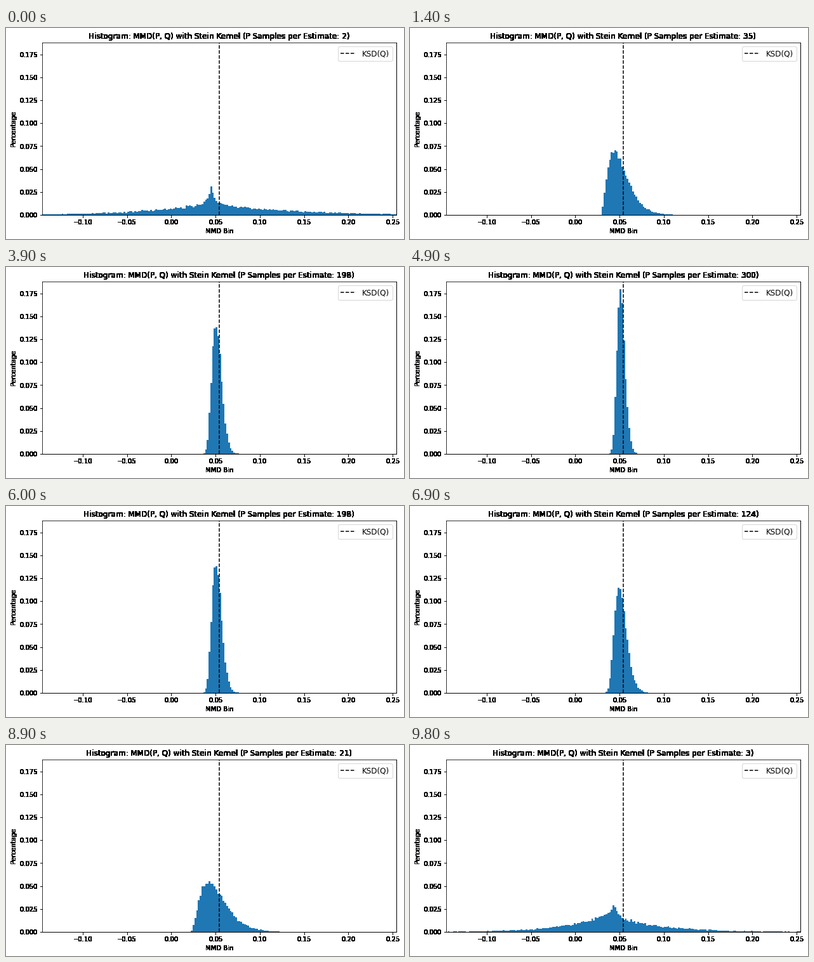
A matplotlib script for the animation above (9900 ms loop, 627 by 333 pixels).

```python
import math

import numpy as np
import matplotlib.pyplot as plt
from matplotlib.animation import FuncAnimation

W, H, DPI = 627, 333, 72
KSD = 0.0541
BIN = 0.002
STEPS = 50
DRAWS = 20000

edges = KSD + BIN * np.arange(-100, 101)
centres = (edges[:-1] + edges[1:]) / 2


def cusp(n):
    """Heavy-tailed peak seen with very few samples."""
    d = centres - 0.045
    tails = np.where(d < 0, 0.007 * n * np.exp(-np.abs(d) * n / 0.14),
                     0.0145 * np.exp(-np.abs(d) * n / 0.165))
    h = tails + 0.08 / n**2 * np.exp(-np.abs(d) / 0.004)
    return h / h.sum()


def hump(n):
    """Shifted gamma density that narrows and loses its skew as n grows."""
    k = max(3, 0.081 * n)
    sd = 0.0795 / math.sqrt(n)
    scale = sd / math.sqrt(k)
    t = np.maximum((centres - (KSD - 0.0021)) / scale + k, 0)
    return BIN / scale * t ** (k - 1) * np.exp(-t) / math.gamma(k)


def heights(n):
    w = np.clip((21 - n) / 18, 0, 1) ** 2
    h = w * cusp(n) + (1 - w) * hump(n)
    return np.random.default_rng(n).poisson(h * DRAWS) / DRAWS


def harden(im, dpi):
    """Make every touched pixel fully opaque."""
    im = im.copy()
    im[..., 3] = im[..., 3] > 0
    return im, 0, 0


plt.rcParams["font.family"] = "DejaVu Sans"
fig = plt.figure(figsize=((W + 0.01) / DPI, (H + 0.01) / DPI), dpi=DPI,
                 facecolor="white")
ax = fig.add_axes((56.85 / W, 37.88 / H, 558 / W, 271.8 / H))

sizes = [int(r * r + 1e-9)
         for r in np.linspace(math.sqrt(2), math.sqrt(300), STEPS)]
levels = [heights(n) for n in sizes]

bars = ax.stairs(levels[0], edges, fill=True, color="#1f77b4")
ax.axvline(KSD, color="black", linestyle="--", linewidth=1.5, label="KSD(Q)")
ax.set_xlim(edges[0], edges[-1])
ax.set_ylim(0, 0.18768)
ax.set_xticks(np.arange(-2, 6) * 0.05)
ax.set_yticks(np.arange(8) * 0.025)
ax.set_xlabel("MMD Bin")
ax.set_ylabel("Percentage")
ax.legend(loc="upper right", fontsize=12)
title = ax.set_title("", fontsize=12)

for side in ("bottom", "right"):
    ax.spines[side].set_linewidth(1)
for artist in (title, ax.xaxis, ax.yaxis):
    artist.set_agg_filter(harden)


def update(frame):
    step = min(frame, 2 * STEPS - 1 - frame)
    bars.set_data(levels[step])
    title.set_text("Histogram: MMD(P, Q) with Stein Kernel "
                   f"(P Samples per Estimate: {sizes[step]})")
    return bars, title


anim = FuncAnimation(fig, update, frames=2 * STEPS - 1, interval=100,
                     repeat=True, repeat_delay=0)
plt.show()
```
